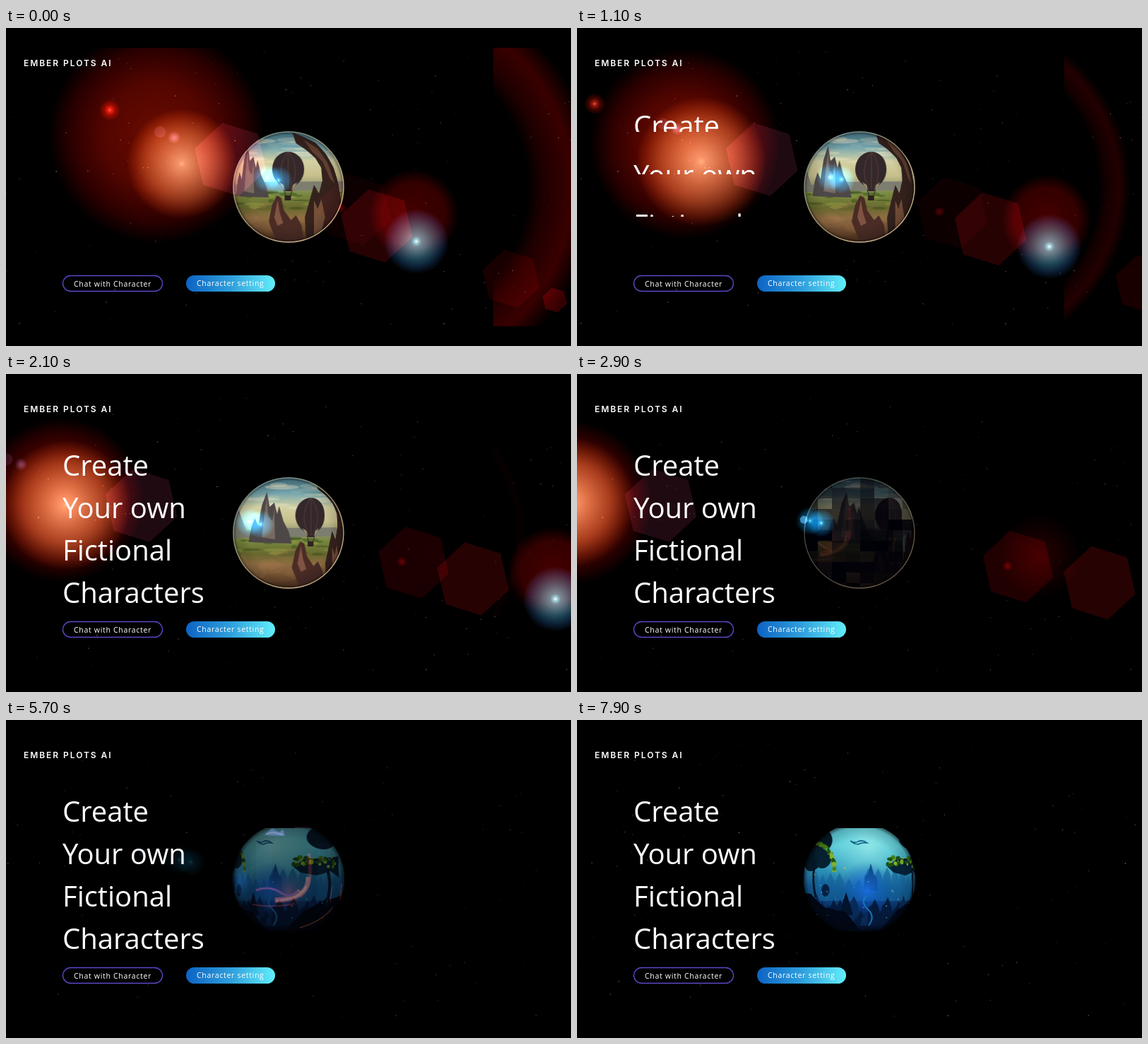
An HTML page with a canvas for the animation above (8000 ms loop, 800 by 450 pixels).

```html
<!DOCTYPE html>
<html lang="en">
<head>
<meta charset="utf-8">
<title>Fictional characters</title>
<style>
  html, body { margin: 0; width: 100%; height: 100%; overflow: hidden; background: #000; }
  canvas, body > svg { position: absolute; left: 0; top: 0; }
  text { fill: #fff; font-family: "Open Sans", "Noto Sans", sans-serif; }
  .line { font-size: 40px; }
  .label { font-size: 10.5px; letter-spacing: .7px; }
  .brand { font: 600 12px Inter, sans-serif; letter-spacing: 1.95px; }
</style>
</head>
<body>
<canvas id="stage" width="800" height="450"></canvas>
<svg width="800" height="450">
  <defs>
    <linearGradient id="pill"><stop stop-color="#0d63c4"/><stop offset=".5" stop-color="#2f9fdc"/><stop offset="1" stop-color="#62eefa"/></linearGradient>
  </defs>
  <text class="brand" x="25" y="54">EMBER PLOTS AI</text>
  <svg y="87" height="60"><text class="line" x="80">Create</text></svg>
  <svg y="147" height="60"><text class="line" x="80">Your own</text></svg>
  <svg y="207" height="60"><text class="line" x="80">Fictional</text></svg>
  <svg y="267" height="60"><text class="line" x="80">Characters</text></svg>
  <rect x="80.5" y="350.5" width="141" height="22" rx="11" fill="none" stroke="#5a48c8" stroke-width="1.3"/>
  <text class="label" x="96" y="366">Chat with Character</text>
  <rect x="255" y="350" width="126" height="23" rx="11.5" fill="url(#pill)"/>
  <text class="label" x="270" y="365">Character setting</text>
</svg>
<script>
const ctx = document.getElementById('stage').getContext('2d');
const lines = [...document.querySelectorAll('.line')];
const LOOP = 8000, R = 79, CX = 400, CY = 225, TOP = CY - R, SPIN = .2;

const clamp = v => Math.max(0, Math.min(1, v));
const smooth = (a, b, v) => { v = clamp((v - a) / (b - a)); return v * v * (3 - 2 * v); };
function seeded(s) {
  return () => (s = (s * 16807) % 2147483647) / 2147483647;
}

function poly(g, color, ...p) {
  g.fillStyle = color;
  g.beginPath();
  for (let i = 0; i < p.length; i += 2) g.lineTo(p[i], p[i + 1]);
  g.fill();
}
function oval(g, color, x, y, rx, ry = rx) {
  g.fillStyle = color;
  g.beginPath();
  g.ellipse(x, y, rx, ry, 0, 0, 7);
  g.fill();
}
function stroke(g, color, width, path) {
  g.strokeStyle = color;
  g.lineWidth = width;
  g.stroke(new Path2D(path));
}
function stops(gradient, list) {
  for (const [at, color] of list) gradient.addColorStop(at, color);
  return gradient;
}
function backdrop(g, list) {
  g.fillStyle = stops(g.createLinearGradient(0, 0, 0, 2 * R), list);
  g.fillRect(0, 0, 400, 2 * R);
}
function glow(g, x, y, r, list) {
  g.fillStyle = stops(g.createRadialGradient(x, y, 0, x, y, r), list);
  g.fillRect(x - r, y - r, 2 * r, 2 * r);
}
function hex(x, y, r, color) {
  const p = [];
  for (let i = 0; i < 6; i++) p.push(x + r * Math.cos(i * Math.PI / 3 + .3), y + r * Math.sin(i * Math.PI / 3 + .3));
  poly(ctx, color, ...p);
}

// Unrolled sphere textures, 400 wide, facing longitude at x = 200.
function texture(paint) {
  const c = document.createElement('canvas');
  c.width = 400;
  c.height = 2 * R;
  paint(c.getContext('2d'));
  return c;
}

const valley = texture(g => {
  const rnd = seeded(11);
  backdrop(g, [[0, '#47798b'], [.14, '#74a5ae'], [.27, '#d5d2a4'], [.4, '#c7bf8c'], [.5, '#8f9471'], [.57, '#77883e'], [.69, '#69682f'], [.78, '#8e6c42'], [1, '#4b2d1d']]);
  for (let i = 0; i < 45; i++) oval(g, `rgba(238,232,200,${.1 + rnd() * .35})`, rnd() * 400, 8 + rnd() * 36, 8 + rnd() * 20, 1 + rnd() * 3);
  for (let i = 0; i < 60; i++) oval(g, rnd() < .5 ? 'rgba(50,75,25,.45)' : 'rgba(150,165,65,.4)', rnd() * 400, 76 + rnd() * 35, 4 + rnd() * 14, 1 + rnd() * 2);
  poly(g, '#7d7d70', 0, 78, 30, 50, 52, 68, 80, 45, 100, 76, 150, 72, 400, 70, 400, 80, 0, 88);
  poly(g, '#4d4748', 104, 92, 110, 70, 116, 58, 122, 68, 128, 40, 136, 21, 140, 42, 147, 36, 151, 52, 154, 41, 160, 62, 168, 78, 172, 94);
  poly(g, '#78695f', 128, 85, 133, 45, 136, 28, 138, 55, 144, 62, 147, 43, 148, 88);
  for (let i = 0; i < 36; i++) oval(g, `rgba(175,125,82,${.06 + rnd() * .14})`, rnd() * 400, 102 + rnd() * 48, 10 + rnd() * 25, 4 + rnd() * 8);
  poly(g, '#35221d', 206, 2, 222, 8, 240, 16, 258, 32, 275, 52, 288, 75, 302, 110, 304, 158, 226, 158, 224, 122, 231, 98, 238, 76, 246, 88, 252, 70, 250, 52, 240, 38, 225, 26, 211, 17);
  poly(g, '#634132', 222, 12, 244, 25, 262, 45, 278, 75, 266, 66, 252, 43, 235, 29);
  poly(g, '#765039', 238, 98, 244, 110, 250, 96, 257, 122, 250, 142, 238, 148);
  poly(g, '#4a2c25', 172, 128, 177, 104, 184, 91, 190, 94, 194, 112, 204, 126, 211, 119, 219, 133, 223, 158, 184, 158);
  poly(g, '#805342', 180, 122, 185, 97, 188, 115, 193, 130, 185, 134);
  oval(g, '#34282b', 200, 54, 23, 25);
  poly(g, '#34282b', 179, 62, 221, 62, 204, 85, 196, 85);
  for (const dx of [-13, 0, 13]) stroke(g, 'rgba(135,100,82,.4)', 1, `M200 29Q${200 + dx * 1.4} 52 ${200 + dx * .3} 82`);
  poly(g, '#a69a72', 187, 72, 195, 84, 193, 76);
  poly(g, '#a69a72', 213, 72, 205, 84, 207, 76);
  stroke(g, '#30211d', 1, 'M194 83L197 92M206 83L203 92');
  g.fillStyle = '#30211d';
  g.fillRect(195, 91, 9, 7);
});

const embers = texture(g => {
  g.fillStyle = '#020102';
  g.fillRect(0, 0, 400, 158);
  for (const x of [90, 132, 225, 270]) {
    g.fillStyle = '#07070d';
    g.fillRect(x, 28, 25, 80);
  }
  glow(g, 98, 82, 32, [[0, '#16508c'], [.5, 'rgba(15,40,95,.6)'], [1, 'rgba(0,0,0,0)']]);
  glow(g, 182, 97, 33, [[0, 'rgba(160,35,12,.75)'], [1, 'rgba(0,0,0,0)']]);
  stroke(g, '#6c1710', 5, 'M211 43C215 75 214 91 198 104');
  stroke(g, '#cc3b20', 7, 'M210 76C211 94 198 108 162 109');
  stroke(g, '#f47845', 3, 'M207 89C202 102 189 107 164 110');
  stroke(g, '#9b273f', 3, 'M132 95Q155 88 170 98T196 94');
  poly(g, '#55439b', 146, 17, 158, 7, 168, 13, 174, 9, 176, 18);
  stroke(g, '#b67ab4', 1.5, 'M149 15Q159 11 173 16');
  stroke(g, '#4d2948', 2, 'M190 6H213');
  stroke(g, '#cf4524', 4, 'M281 86Q275 101 278 111');
  stroke(g, '#495ec2', 4, 'M300 82Q296 96 300 106');
  stroke(g, '#702018', 2, 'M252 89L248 112M126 115Q160 120 190 114');
});

const grotto = texture(g => {
  const rnd = seeded(29);
  backdrop(g, [[0, '#52bed0'], [.2, '#5bc9d5'], [.4, '#3098b9'], [.58, '#145c9b'], [.75, '#0a3168'], [1, '#020719']]);
  glow(g, 196, 32, 75, [[0, 'rgba(165,242,239,.7)'], [1, 'rgba(100,220,230,0)']]);
  for (let x = 70; x < 340; x += 14) {
    const y = 61 + rnd() * 25;
    poly(g, 'rgba(20,99,151,.65)', x - 9, 110, x - 6, y + 12, x, y, x + 6, y + 12, x + 9, 110);
  }
  poly(g, '#114d7e', 189, 94, 191, 75, 195, 72, 199, 57, 204, 73, 208, 77, 210, 96);
  glow(g, 194, 94, 40, [[0, 'rgba(28,115,245,.75)'], [1, 'rgba(0,70,180,0)']]);
  for (let x = 75; x < 340; x += 10) {
    const y = 99 + rnd() * 26;
    poly(g, rnd() < .5 ? '#082a58' : '#051a3c', x - 11, 145, x - 9, y + 12, x - 4, y + 8, x, y, x + 5, y + 10, x + 12, 145);
  }
  oval(g, '#062043', 131, 95, 7, 9);
  poly(g, '#04132c', 155, 130, 160, 108, 164, 98, 168, 110, 174, 130);
  poly(g, '#020817', 60, 98, 100, 100, 130, 119, 164, 126, 183, 151, 215, 150, 240, 124, 270, 110, 340, 98, 340, 158, 60, 158);
  stroke(g, '#1979bc', 2, 'M193 103Q184 112 195 122T196 145');
  oval(g, '#041b2b', 114, 24, 29, 20);
  oval(g, '#041b2b', 98, 43, 31, 25);
  oval(g, '#062232', 125, 48, 17, 16);
  stroke(g, '#04192c', 5, 'M113 50Q100 76 112 105');
  oval(g, '#062035', 272, 20, 28, 17);
  poly(g, '#062238', 225, 62, 240, 50, 266, 50, 305, 47, 306, 77, 285, 68, 260, 74, 235, 70);
  stroke(g, '#05172d', 6, 'M278 65Q290 85 276 117');
  for (let i = 0; i < 70; i++) {
    const left = i < 38, a = rnd() * 1.7;
    const x = left ? 115 + 31 * Math.sin(a) : 225 + rnd() * 72;
    const y = left ? 65 - 36 * Math.cos(a) : 48 + rnd() * 14;
    oval(g, ['#1c5018', '#467f18', '#82b22b'][i % 3], x, y, 2 + rnd() * 3, 1 + rnd() * 3);
  }
  stroke(g, '#12618a', 1.5, 'M170 25Q177 29 181 26Q187 23 194 28Q186 27 181 30Q176 30 170 25');
  for (let i = 0; i < 28; i++) oval(g, i % 4 ? '#6ad6ee' : '#d3cb6a', 100 + rnd() * 190, 25 + rnd() * 110, .5 + rnd() * .5);
  stroke(g, '#a25336', 1.5, 'M234 148Q268 138 290 119');
  g.fillStyle = '#000';
  g.fillRect(0, 0, 400, 7);
  g.fillRect(0, 153, 400, 5);
});

function wrap(tex, alpha, turn) {
  if (alpha <= 0) return;
  ctx.globalAlpha = alpha;
  for (let i = 0; i < 2 * R; i++) {
    const u = 200 + R * (Math.asin((i + .5 - R) / R) - SPIN * turn);
    ctx.drawImage(tex, u, 0, 1, 2 * R, CX - R + i, TOP, 1, 2 * R);
  }
  ctx.globalAlpha = 1;
}

function globe(t) {
  const day = 1 - smooth(2.4, 3.4, t);
  ctx.save();
  ctx.beginPath();
  ctx.arc(CX, CY, R, 0, 7);
  ctx.fillStyle = '#000';
  ctx.fill();
  ctx.clip();
  wrap(embers, 1, t - 4.5);
  wrap(valley, day, t);
  if (day > 0 && day < 1) {
    const rnd = seeded(7);
    for (let y = TOP; y < TOP + 2 * R; y += 15)
      for (let x = CX - R; x < CX + R; x += 20) {
        const low = y > 195 ? .45 : 0;
        ctx.fillStyle = `rgba(0,0,8,${clamp((rnd() * .8 + low) * (1 - day) * 2)})`;
        ctx.fillRect(x, y, 20, 15);
      }
  }
  wrap(grotto, smooth(5.2, 6.2, t), t - 6.8);
  ctx.fillStyle = stops(ctx.createRadialGradient(CX, CY, R * .72, CX, CY, R), [[0, 'rgba(0,0,0,0)'], [.75, 'rgba(0,0,0,.16)'], [1, 'rgba(0,0,0,.6)']]);
  ctx.fillRect(CX - R, TOP, 2 * R, 2 * R);
  ctx.globalAlpha = day;
  ctx.lineWidth = 1.3;
  ctx.strokeStyle = stops(ctx.createLinearGradient(335, 150, 465, 300), [[0, '#718b87'], [.5, '#a39c7b'], [1, '#e2c29a']]);
  ctx.beginPath();
  ctx.arc(CX, CY, R - 1, 0, 7);
  ctx.stroke();
  ctx.restore();
}

const rand = seeded(42);
const stars = Array.from({ length: 165 }, () => ({ x: rand() * 800, y: 30 + rand() * 390, a: .1 + rand() ** 2 * .55, s: .6 + rand() * .6 }));

function drawStars(t) {
  const dim = 1 - .8 * smooth(2, 4.2, t) * (1 - smooth(4.7, 6.5, t));
  ctx.fillStyle = '#fff';
  for (const s of stars) {
    ctx.globalAlpha = s.a * dim;
    ctx.fillRect((s.x - 12 * t + 800) % 800, s.y, s.s, s.s);
  }
  ctx.globalAlpha = 1;
}

function flare(t) {
  const d = 56.3 * t + 7.9 * t * t + 1.2 * t ** 3;
  const x = 249 - d, y = 192 - .04 * d;
  const lean = clamp(1 - d / 200);
  const fade = 1 - smooth(5, 6, t);
  ctx.globalCompositeOperation = 'lighter';
  ctx.globalAlpha = fade;

  glow(ctx, x - 36 * lean, y - 40 * lean, Math.max(116, 153 - .25 * d), [[0, 'rgb(105,12,0)'], [.5, 'rgb(82,5,0)'], [.8, 'rgb(42,0,0)'], [1, '#000']]);
  glow(ctx, x, y, 78 + 14 * smooth(0, 1.1, t), [[0, 'rgb(195,170,130)'], [.06, 'rgb(155,140,105)'], [.3, 'rgb(125,100,67)'], [.62, 'rgb(84,54,28)'], [.85, 'rgb(38,17,5)'], [1, '#000']]);
  glow(ctx, 147 - 1.67 * d, 116 - .12 * d, 15, [[0, '#ef694d'], [.15, '#a51d16'], [.5, '#480600'], [1, '#000']]);
  glow(ctx, 238 - 1.32 * d, 155 - .165 * d, 9, [[0, '#48345f'], [.5, '#201e32'], [1, '#000']]);
  oval(ctx, 'rgba(80,65,120,.25)', 218 - 1.32 * d, 147 - .16 * d, 8);
  hex(318 - .77 * d, 186, 53, 'rgba(58,18,32,.55)');

  const cx = 581 + 1.2 * d, cy = 302 + .1 * d;
  glow(ctx, cx - 4, cy - 38, 64, [[0, '#400'], [.7, '#300'], [1, '#000']]);
  glow(ctx, cx, cy, 46, [[0, '#d9ffff'], [.06, '#6ad3dc'], [.16, '#468894'], [.5, '#204c5b'], [.8, '#0a1b30'], [1, '#000']]);
  hex(525 + .83 * d, 280 + .06 * d, 53, 'rgb(38,2,3)');
  hex(495 + .5 * d, 257 + .06 * d, 52, `rgb(${12 + 20 * smooth(1.3, 2.5, t)},0,1)`);
  if (t > 2) glow(ctx, 525 + .5 * d, 242 + .06 * d, 60, [[0, `rgb(${40 * smooth(2, 2.8, t)},0,0)`], [1, '#000']]);
  glow(ctx, 475 + .52 * d, 255 + .065 * d, 7, [[0, '#450704'], [.6, '#280000'], [1, '#000']]);
  hex(715 + 1.2 * d, 355 + .1 * d, 42, 'rgb(24,0,0)');
  hex(777 + 1.4 * d, 385, 18, 'rgb(52,0,3)');

  const ring = clamp(1 - d / 190);
  if (ring) {
    ctx.globalAlpha = ring * fade;
    ctx.fillStyle = stops(ctx.createRadialGradient(540, 225, 198, 540, 225, 295 - .7 * d), [[0, '#000'], [.25, '#200000'], [.65, '#390000'], [1, '#000']]);
    ctx.fillRect(690, 28, 110, 394);
    ctx.globalAlpha = fade;
  }

  const px = 378 - .155 * d, py = 214 - .018 * d;
  for (const dx of [-8, 8]) {
    glow(ctx, px + dx, py + dx * .2, 20, [[0, '#b5ffff'], [.08, '#278caf'], [.25, '#0b4e77'], [.65, '#042d42'], [1, '#000']]);
  }
  hex(382 - .235 * d, 215 - .034 * d, 6, `rgba(55,90,115,${smooth(2.2, 2.9, t)})`);
  ctx.globalAlpha = 1;
  ctx.globalCompositeOperation = 'source-over';
}

function frame(now) {
  const t = Math.floor(now % LOOP / 100) / 10;
  ctx.fillStyle = '#000';
  ctx.fillRect(0, 0, 800, 450);
  ctx.save();
  ctx.beginPath();
  ctx.rect(0, 28, 800, 394);
  ctx.clip();
  drawStars(t);
  globe(t);
  flare(t);
  ctx.restore();
  lines.forEach((line, i) => {
    const start = .54 + .13 * i;
    line.setAttribute('y', 57 + 42 * (1 - smooth(start, start + .8, t)));
  });
  requestAnimationFrame(frame);
}
requestAnimationFrame(frame);
</script>
</body>
</html>
```
